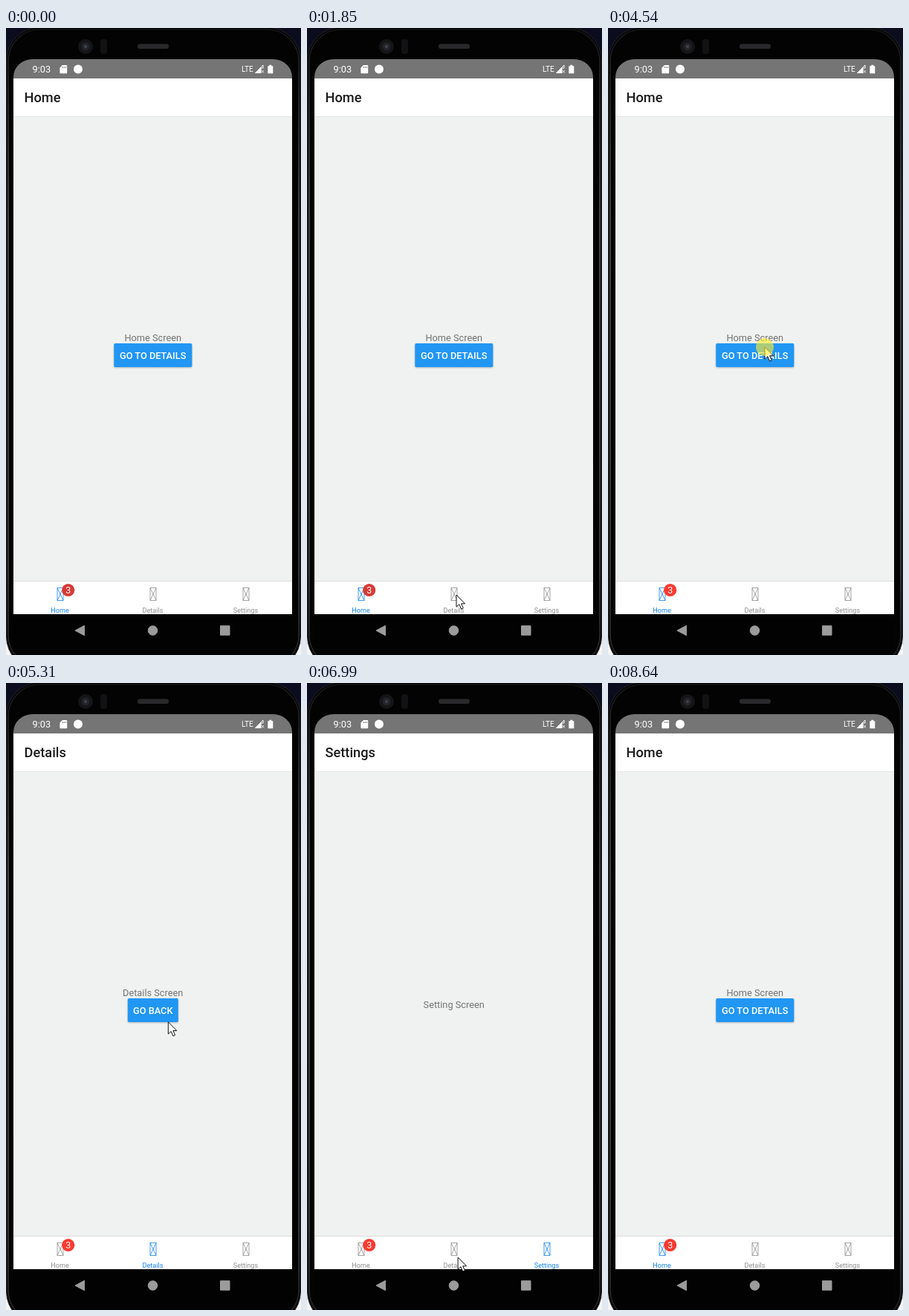
An HTML page for the animation above (9.57 s loop, 397x845 px).

```html
<!DOCTYPE html>
<html lang="en">
<head>
<meta charset="utf-8">
<title>Tab navigation</title>
<style>
  html, body { margin: 0; width: 100%; height: 100%; overflow: hidden; background: #000; }
  svg { display: block; width: 397px; height: 845px; font-family: Roboto, sans-serif; }
  .mid { text-anchor: middle; }
  .title { font-size: 18.24px; font-weight: 500; fill: #1c1c1e; }
  .body { font-size: 12.77px; fill: #737373; }
  .caps { font-size: 12.77px; font-weight: 500; fill: #fff; }
  .tab { color: #8e8e8f; }
  .tab.on { color: #1583ee; }
  .tab text { font-size: 9.12px; fill: currentColor; }
  .tab path { fill: none; stroke: currentColor; stroke-width: .8; }
  .button { fill: #2196f3; filter: drop-shadow(0 1.5px 1px rgba(0, 0, 0, .25)); }
</style>
</head>
<body>
<svg viewBox="0 0 397 845">
  <defs>
    <linearGradient id="edge" x2="0" y2="1">
      <stop offset="0" stop-color="#1a1a1c"/>
      <stop offset=".3" stop-color="#6e6e70"/>
      <stop offset=".85" stop-color="#58585a"/>
      <stop offset="1" stop-color="#222"/>
    </linearGradient>
  </defs>

  <!-- Phone -->
  <rect width="397" height="845" fill="#0b0c1e"/>
  <rect y="700" width="397" height="145" fill="#f4f4f4"/>
  <rect x=".5" y="-1" width="396" height="866" rx="45" fill="#060607" stroke="#222225"/>
  <rect x="3" y="2" width="391" height="859" rx="43" fill="#030304" stroke="url(#edge)" stroke-width="1.2"/>
  <circle cx="107" cy="25" r="10" fill="#151517"/>
  <circle cx="107" cy="25" r="5.5" fill="#222429"/>
  <circle cx="107" cy="25" r="2.2" fill="#3c4148"/>
  <rect x="127" y="15" width="9" height="20" rx="4" fill="#121214"/>
  <rect x="177" y="21.5" width="42" height="6.5" rx="3" fill="#29292b"/>

  <!-- Status bar -->
  <path d="M10 68V66a26 24 0 0 1 26-24H359a26 24 0 0 1 26 24V68Z" fill="#757575"/>
  <g fill="#fff">
    <text x="35.5" y="60" font-size="12.77">9:03</text>
    <path d="M76 50h5.2q1 0 1 1v9.200q0 1-1 1h-7.800q-1 0-1-1V53.600Z"/>
    <path d="M76.500 52v2M78.500 52v2M80.500 52v2" stroke="#757575" stroke-width=".9"/>
    <circle cx="97" cy="55.500" r="6"/>
    <text x="317" y="59" font-size="10">LTE</text>
    <path d="M335.500 60.500L346 50v4h-3v6.500Z" fill="none" stroke="#fff"/>
    <path d="M336 60.500l6.500-6.500v6.500ZM344 57l3 3.500M347 57l-3 3.500" stroke="#fff" stroke-width=".8"/>
    <path d="M352.300 51.200h2v-1.500h3v1.500h2V61.200h-7Z"/>
  </g>

  <!-- App -->
  <rect x="10" y="68" width="375" height="722" fill="#f0f2f1"/>
  <rect x="10" y="68" width="375" height="51" fill="#fff"/>
  <rect x="10" y="119" width="375" height=".7" fill="#dfe1e0"/>
  <text id="title" class="title" x="24.500" y="100"></text>
  <text id="body" class="body mid" x="197.700"></text>
  <g id="action">
    <rect id="button" class="button" y="425" height="32" rx="1.800"/>
    <text id="caps" class="caps mid" x="197.700" y="446"></text>
  </g>
  <rect x="10" y="745" width="375" height="45" fill="#fff"/>
  <rect x="10" y="745" width="375" height="1" fill="#dcdddd"/>
  <g id="tabs"></g>
  <circle id="badge" cx="83.700" cy="757.500" r="8.600"/>
  <text class="mid" x="83.700" y="762" font-size="12.500" fill="#fff">3</text>

  <!-- System navigation -->
  <rect x="10" y="790" width="375" height="46" fill="#020203"/>
  <g fill="#9b9b9b" stroke="#9b9b9b" stroke-linejoin="round">
    <path d="M93 812l12.500-6.700v13.400Z"/>
    <circle cx="197.500" cy="812" r="6.300"/>
    <rect x="288.500" y="805.700" width="12.500" height="12.500"/>
  </g>

  <path id="cursor" d="M0 0V16.200l3.900-3.500 2.700 6.300 2.700-1.200-2.700-6H11.500Z" fill="#fff" stroke="#111" stroke-width="1"/>
  <circle id="ring" r="12" fill="#ffee2e"/>
</svg>
<script>
const LOOP = 9570, SHOW = 190, HIDE = 8640;
const $ = id => document.getElementById(id);

const screens = [
  { title: 'Home', body: 'Home Screen', y: 421.5, action: 'GO TO DETAILS', width: 105 },
  { title: 'Details', body: 'Details Screen', y: 421.5, action: 'GO BACK', width: 68 },
  { title: 'Settings', body: 'Setting Screen', y: 437.5 }
];
const [HOME, DETAILS, SETTINGS] = [0, 1, 2];

// Start time and visible screen
const visits = [
  [0, HOME], [2040, DETAILS], [2890, SETTINGS], [3900, HOME], [4750, DETAILS],
  [5770, HOME], [6440, SETTINGS], [7180, DETAILS], [8000, HOME]
];
const clicks = [1960, 2800, 3820, 4530, 5690, 6360, 7090, 7900];

// Time, x, y of the pointer tip
const path = [
  [190, 361, 834], [400, 290, 650], [610, 194, 482], [870, 194, 482],
  [1060, 165, 442], [1400, 135, 580], [1780, 201, 764], [2120, 201, 764],
  [2580, 350, 768], [2780, 333, 767], [2880, 330, 767], [3100, 109, 762],
  [3180, 109, 762], [3450, 78, 768], [3960, 80, 768], [4460, 211, 430],
  [4640, 211, 430], [5100, 226, 466], [5600, 206, 442], [5800, 206, 442],
  [6200, 331, 777], [6480, 331, 777], [7000, 203, 774], [7220, 203, 774],
  [7610, 104, 776], [7810, 104, 776], [7900, 88, 779], [8040, 88, 779],
  [8360, 300, 790], [8640, 384, 846]
];

const ease = p => p * p * (3 - 2 * p);

function tipAt(t) {
  const i = path.findIndex(key => key[0] > t);
  if (i < 1) return path[i < 0 ? path.length - 1 : 0].slice(1);
  const [t0, x0, y0] = path[i - 1], [t1, x1, y1] = path[i];
  const p = ease((t - t0) / (t1 - t0));
  return [x0 + (x1 - x0) * p, y0 + (y1 - y0) * p];
}

function ringAt(t) {
  const age = t - clicks.findLast(c => c <= t);
  return age < 160 ? 0.62 : Math.max(0, 0.62 * (1 - (age - 160) / 100));
}

$('tabs').innerHTML = screens.map((s, i) => {
  const x = 72.5 + 125 * i;
  return `<g class="tab"><path d="M${x - 3.5} 754.500h8v17h-8ZL${x + 4.5} 771.500M${x + 4.5} 754.500L${x - 3.5} 771.500"/>
    <text class="mid" x="${x}" y="788">${s.title}</text></g>`;
}).join('');
const tabs = [...$('tabs').children];

let shown = -1;
function showScreen(n) {
  if (n === shown) return;
  shown = n;
  const s = screens[n];
  $('title').textContent = s.title;
  $('body').textContent = s.body;
  $('body').setAttribute('y', s.y);
  $('action').style.display = s.action ? '' : 'none';
  if (s.action) {
    $('caps').textContent = s.action;
    $('button').setAttribute('x', 197.8 - s.width / 2);
    $('button').setAttribute('width', s.width);
  }
  tabs.forEach((tab, i) => tab.classList.toggle('on', i === n));
}

function render(t) {
  showScreen(visits.findLast(v => v[0] <= t)[1]);
  $('badge').setAttribute('fill', t < 3900 ? '#d73a35' : '#f93a30');
  const visible = t >= SHOW && t < HIDE;
  const at = `translate(${tipAt(t).join(' ')})`;
  $('cursor').setAttribute('transform', at);
  $('ring').setAttribute('transform', at);
  $('cursor').style.display = visible ? '' : 'none';
  $('ring').style.opacity = visible ? ringAt(t) || 0 : 0;
}

const start = performance.now();
function tick() {
  render((performance.now() - start) % LOOP);
  requestAnimationFrame(tick);
}
tick();
</script>
</body>
</html>
```
